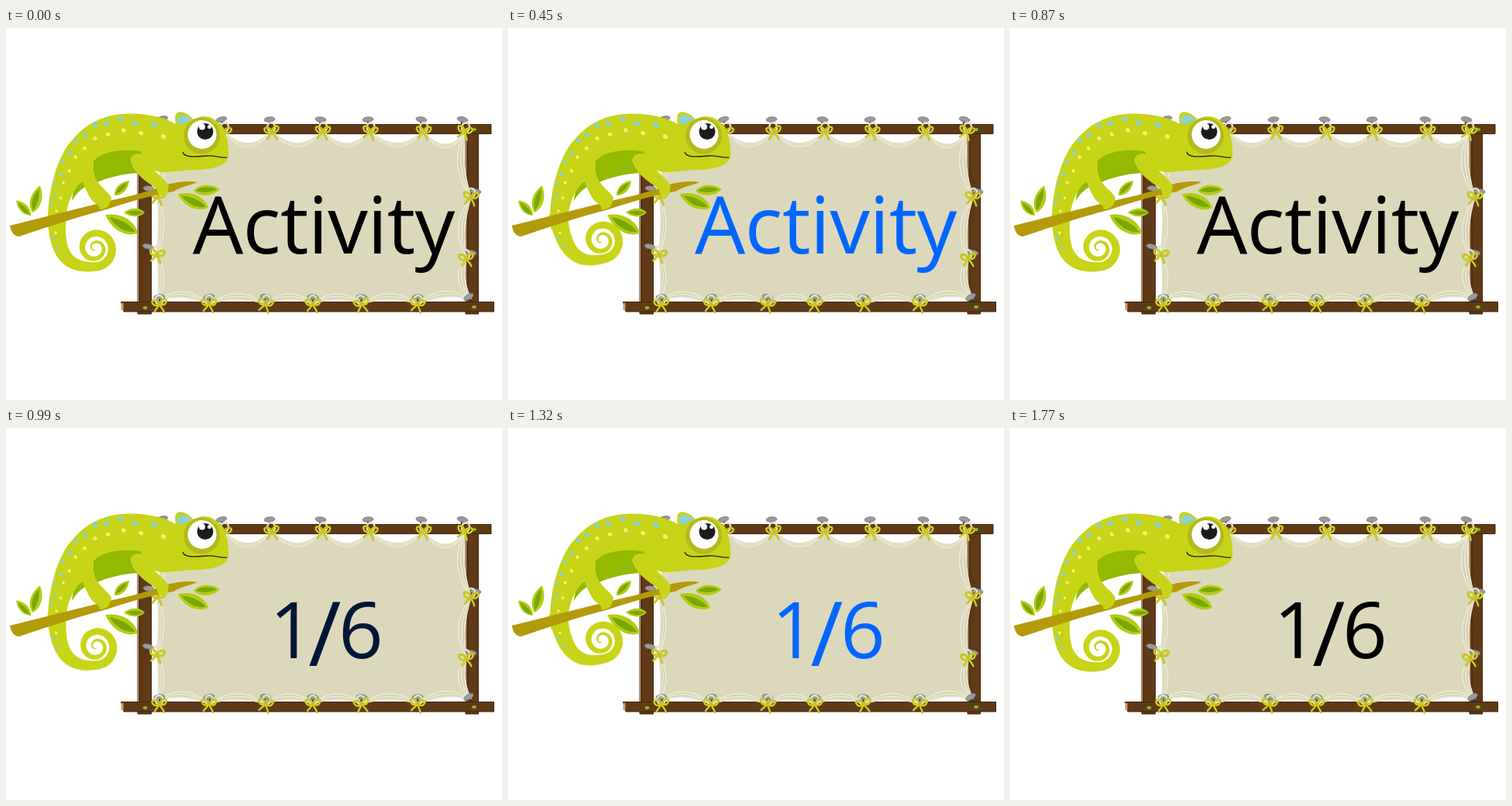
Animation, 640 px wide and 480 px high, one loop 1.8 s. Source, as an HTML page:

```html
<!DOCTYPE html>
<html lang="en">
<head>
<meta charset="utf-8">
<title>Activity sign</title>
<style>
html, body { margin: 0; width: 100%; height: 100%; overflow: hidden; background: #fff; }
svg { display: block; width: 640px; height: 480px; }
.label {
  font-family: "Open Sans", "Noto Sans", sans-serif;
  font-kerning: none;
  animation: ink 450ms steps(15, jump-none) infinite alternate;
}
#word { font-size: 103px; letter-spacing: -.6px; }
#count { font-size: 101px; letter-spacing: -3.5px; }
#slash { font-size: 115px; }
.first { animation: first 1800ms step-end infinite; }
.second { animation: second 1800ms step-end infinite; }
#tail {
  transform-origin: 62px 247px;
  animation: sway 450ms steps(15, jump-none) infinite alternate;
}
#lid { transform-origin: 253px 119px; animation: blink 900ms step-end infinite; }
@keyframes ink { from { fill: #000; } to { fill: #06f; } }
@keyframes sway { from { transform: rotate(0deg); } to { transform: rotate(-10.5deg); } }
@keyframes first { 0% { opacity: 1; } 50%, 100% { opacity: 0; } }
@keyframes second { 0% { opacity: 0; } 50%, 100% { opacity: 1; } }
@keyframes blink {
  0%, 30%, 100% { transform: scaleY(0); }
  13.333%, 26.666% { transform: scaleY(.1); }
  16.666%, 23.333% { transform: scaleY(.55); }
  20% { transform: scaleY(1); }
}
</style>
</head>
<body>
<svg viewBox="0 0 640 480">
  <defs>
    <clipPath id="eyeball"><circle cx="253" cy="137.500" r="18.500"/></clipPath>
    <path id="ribbon" fill="none" stroke-linecap="round"
      d="M0 0C-3 -7 -11 -7 -9 -2C-7 3 -3 2 0 0C3 -7 11 -7 9 -2C7 3 3 2 0 0C-2 4 -5 6 -7 9M0 0C1 5 4 6 5 11"/>
    <g id="bow">
      <ellipse cy="-5" rx="5" ry="6" fill="none" stroke="#e4dfc2" stroke-width="2.500"/>
      <use href="#ribbon" stroke="#a39f14" stroke-width="2.600"/>
      <use href="#ribbon" stroke="#d8d61a" stroke-width="1.700"/>
      <circle r="2.200" fill="#c8c512"/>
    </g>
    <g id="nail">
      <path d="M-1 2L0 9L1 2Z" fill="#333" stroke="#333"/>
      <ellipse rx="7" ry="3.200" fill="#9a9a9c" stroke="#77777a" stroke-width=".8"/>
    </g>
    <g id="leaf">
      <path d="M0 0C.25 -.28 .7 -.25 1 0C.7 .25 .25 .28 0 0Z" fill="#b2cc15"/>
      <path d="M.08 0C.3 -.16 .6 -.15 .88 0C.6 .11 .3 .1 .08 0Z" fill="#7ba600"/>
    </g>
  </defs>

  <g fill="#603a17" stroke="#42240c">
    <path d="M170 125H187.500V369H170Z"/>
    <path d="M593 125H609.500V369H593Z"/>
    <path d="M160 124.500H626V136.500H160Z"/>
    <path d="M148.500 353.500H629.500V366H152Z"/>
  </g>
  <g fill="none" stroke="#b98d62" stroke-width="1.500">
    <path d="M170.500 138V353M593.500 138V353"/>
    <path d="M150 355V364" stroke="#c9a27a" stroke-width="3"/>
  </g>
  <path d="M172.500 138V353M596 138V353" stroke="#42240c"/>
  <g fill="#8cb82b" stroke="#42240c" stroke-width=".6">
    <ellipse cx="179.500" cy="361" rx="3.300" ry="2.400"/>
    <ellipse cx="604" cy="360" rx="3.300" ry="2.400"/>
    <ellipse cx="604" cy="131" rx="3.300" ry="2.400"/>
  </g>

  <g id="cloth"></g>
  <g id="ties"></g>

  <g class="first"><text id="word" class="label" x="241" y="291">Activity</text></g>
  <g class="second"><text id="count" class="label" x="340" y="296.500">1<tspan id="slash" dx="-4" dy="10">/</tspan><tspan dy="-10">6</tspan></text></g>

  <g id="leaves"></g>

  <g id="tail"><path id="coil" fill="#c7d417"/></g>

  <g fill="#93b900">
    <path d="M112 160L180 155L186 187C160 186 135 191 113 201Z"/>
    <path d="M85 223C87 205 94 193 108 190L109 202C98 206 91 213 85 223Z"/>
  </g>
  <path fill="#c7d417" d="M219 124C205 116 185 110.500 160 110.500C122 110.500 97 127 78 154C64 176 54 212 54 250L56 260Q66 266 77 260C76 240 80 222 90 207C96 199 104 194 113 192V172C122 160 148 155 174 159L178 172C188 184 197 187 207 186L235 183.500C262 183 284 180 287 166C289 140 278 115 256 114C250 114 246 116 242 118C236 111 228 107 222 108.500C217 111 218 118 219 124Z"/>
  <g id="spots"></g>
  <path fill="#8fd0d0" d="M223 112Q234 112 241 118Q232 120 228 125Q222 123 220 122Z"/>

  <path fill="#b29a09" d="M5 255C45 245 85 235 125 225C160 217 185 211 205 203C220 198 238 197 247 199C238 203 225 205 216 211C190 215 160 224 130 234C90 244 50 258 17 269C10 269 6 262 5 255Z"/>
  <path fill="#c7d417" d="M92 178C98 163 112 168 113 185C116 203 130 208 136 219C135 230 129 234 121 234C121 227 112 226 108 218C103 210 101 202 96 193Z"/>
  <path fill="#c7d417" d="M160 170C164 158 180 160 184 172C190 186 205 193 210 204L208 215C200 219 195 215 195 208C185 200 165 190 160 170Z"/>

  <circle cx="252.500" cy="139" r="23.500" fill="#b3ba1b"/>
  <circle cx="253" cy="137.500" r="18.500" fill="#fff"/>
  <circle cx="257" cy="133.500" r="10.500" fill="#1c1c1e"/>
  <circle cx="253" cy="127.500" r="4" fill="#fff"/>
  <circle cx="262.500" cy="127.500" r="2.500" fill="#fff"/>
  <g clip-path="url(#eyeball)"><rect id="lid" x="233" y="119" width="40" height="38" fill="#b3ba1b"/></g>
  <path d="M228 160C230 168 246 166 259 165C270 164 276 168 285 167" fill="none" stroke="#25260a" stroke-width="1.300"/>
</svg>

<script>
const SVG = "http://www.w3.org/2000/svg";
const byId = id => document.getElementById(id);

function add(parent, tag, attrs) {
  const el = document.createElementNS(SVG, tag);
  for (const key in attrs) el.setAttribute(key, attrs[key]);
  byId(parent).append(el);
}

const put = (parent, id, x, y, extra) =>
  add(parent, "use", { href: "#" + id, transform: `translate(${x} ${y}) ${extra}` });

// Each side of the cloth runs through its ties; sag pulls the edge inward
const corners = [[200, 136], [592, 136], [600, 350], [196, 351]];
const sides = [
  { ties: [281, 343, 409, 470, 539].map(x => [x, 133]), sag: [0, 32], fold: [0, 40], nail: [-3, -15] },
  { ties: [[600, 218], [594, 297]], sag: [-10, 0], fold: [-26, 0], nail: [6, -7] },
  { ties: [531, 459, 396, 335, 262].map(x => [x, 356]), sag: [0, -12], fold: [0, -26], nail: [0, -9] },
  { ties: [[195, 292], [196, 217]], sag: [3, 0], fold: [16, 0], nail: [-12, -10] }
];

function swag(points, [dx, dy]) {
  return points.slice(1).map(([x, y], i) => {
    const [px, py] = points[i];
    return `Q${(px + x) / 2 + dx} ${(py + y) / 2 + dy} ${x} ${y}`;
  }).join("");
}

sides.forEach((side, i) => side.edge = [corners[i], ...side.ties, corners[(i + 1) % 4]]);
add("cloth", "path", {
  d: `M${corners[0]}${sides.map(s => swag(s.edge, s.sag)).join("")}Z`,
  fill: "#dcd8bc", stroke: "#c8c2a0", "stroke-width": .8
});
for (const { edge, sag, fold } of sides) {
  for (let k = 0; k <= 4; k++) {
    const pull = sag.map((s, i) => s + (fold[i] - s) * k / 4);
    add("cloth", "path", {
      d: `M${edge[0]}${swag(edge, pull)}`, fill: "none",
      stroke: k % 2 ? "#cdc8a8" : "#ebe7d0", "stroke-width": k % 2 ? .9 : 2
    });
  }
}

// A nail and a bow at every tie, tilted a little differently
let seed = 7;
const tilt = range => {
  seed = seed * 16807 % 2147483647;
  return (seed / 2147483647 - .5) * range;
};
function tie([x, y], [dx, dy]) {
  put("ties", "nail", x + dx, y + dy, `rotate(${tilt(30)})`);
  put("ties", "bow", x, y, `rotate(${tilt(30)})`);
}
for (const { ties, nail } of sides) ties.forEach(p => tie(p, nail));
tie([592, 133], sides[0].nail);
tie([198, 356], sides[2].nail);
put("ties", "nail", 202, 117, "rotate(-12)");
put("ties", "nail", 597, 347, "rotate(-30)");

// Leaves: stem x, y, direction, length
for (const [x, y, turn, size] of [
  [32, 242, -134, 27], [34, 238, -74, 36], [140, 216, -45, 27], [170, 265, -150, 48],
  [179, 238, 180, 27], [261, 232, -156, 43], [242, 210, -3, 34]
]) put("leaves", "leaf", x, y, `rotate(${turn}) scale(${size})`);

function bezier(p, t) {
  const s = 1 - t;
  const mix = i => s * s * s * p[0][i] + 3 * s * s * t * p[1][i] + 3 * s * t * t * p[2][i] + t * t * t * p[3][i];
  return [mix(0), mix(1)];
}

// Spots follow the back and shrink toward the tail
function spots(color, guide, count, size, wobble) {
  for (let i = 0; i < count; i++) {
    const t = i / (count - 1), [x, y] = bezier(guide, t);
    const side = i % 2 ? wobble : 0;
    add("spots", "ellipse", {
      cx: x + side * t, cy: y + side * (1 - t), rx: size * (1 - t / 2), ry: size * (.8 - t / 4),
      fill: color, transform: `rotate(35 ${x} ${y})`
    });
  }
}
spots("#8fd0c2", [[191, 125], [95, 90], [63, 180], [58, 226]], 13, 4.2, 5);
spots("#f4f263", [[203, 140], [105, 108], [75, 175], [65, 236]], 11, 3.4, 3);

// Tapering tail: a bend that runs into a two-turn spiral
const hook = [[66, 240], [64, 284], [74, 311], [115, 308]];
const spine = [];
for (let t = 0; t < 1; t += 1 / 24) spine.push([...bezier(hook, t), 24 - 12.5 * t]);
for (let i = 0; i <= 90; i++) {
  const u = i / 90, a = Math.PI * (.5 - 4 * u), r = 24 - 22 * u ** 1.1;
  spine.push([115 + r * Math.cos(a), 284 + r * Math.sin(a), 1 + 10.5 * (1 - u) ** 1.1]);
}

const edge = side => spine.map(([x, y, w], i) => {
  const a = spine[Math.max(i - 1, 0)], b = spine[Math.min(i + 1, spine.length - 1)];
  const dx = b[0] - a[0], dy = b[1] - a[1], k = side * w / 2 / (Math.hypot(dx, dy) || 1);
  return `${(x - dy * k).toFixed(2)} ${(y + dx * k).toFixed(2)}`;
});
byId("coil").setAttribute("d", "M" + [...edge(1), ...edge(-1).reverse()].join("L") + "Z");
for (const [cx, cy, fill] of [[64, 264, "#f4f263"], [61, 271, "#8fd0c2"], [66, 283, "#8fd0c2"]]) {
  add("tail", "ellipse", { cx, cy, rx: 2, ry: 2.6, fill });
}
</script>
</body>
</html>
```
